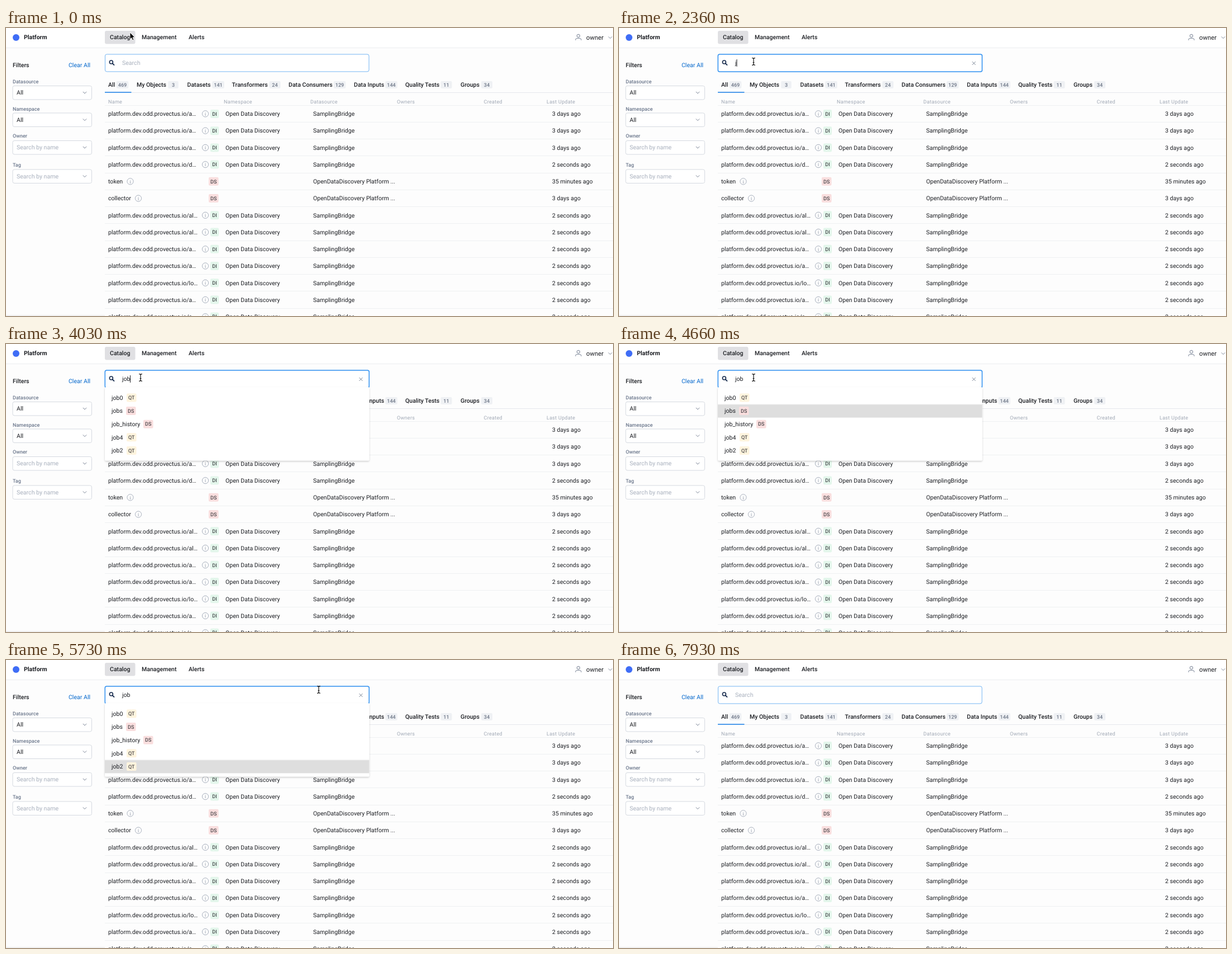
These frames come from a looping animation (1087 by 515 pixels, 8 s). An HTML page:

```html
<!DOCTYPE html>
<html lang="en">
<head>
<meta charset="utf-8">
<title>Catalog search</title>
<style>
html, body { margin: 0; width: 100%; height: 100%; overflow: hidden; background: #fdfdfd; }
svg { display: block; }
text { font: 400 10.57px Roboto, sans-serif; fill: #1c1e23; white-space: pre; text-rendering: geometricPrecision; }
.medium { font-weight: 500; }
.bold { font-weight: 700; }
.link { fill: #0066cc; }
.hint { fill: #a8b0bd; }
.user { font-size: 11.3px; }
.label { font-size: 9.06px; font-weight: 500; fill: #6b778c; }
.head { font-size: 9.06px; letter-spacing: .03em; fill: #a0a8b5; }
.chip, .badge { font-size: 9.06px; text-anchor: middle; }
.chip { font-weight: 500; fill: #6b7485; }
.info { font-size: 8.5px; text-anchor: middle; fill: #8a93a3; }
.line { fill: none; stroke: #a8b0bd; }

/* Percentages are shares of the 8 s loop: 1% = 80 ms. */
.a { animation: 8s step-end -20ms infinite; }
.focus { animation-name: focus; }
.blur { animation-name: blur; }
.menu { animation-name: menu; }
.mark { animation-name: mark; }
.empty { animation-name: empty; }
.j { animation-name: j; }
.o { animation-name: o; }
.b { animation-name: b; }
.caret { animation-name: caret; }
.loading { animation-name: loading; }
.pointer { animation-name: pointer; }
.arrow { animation-name: arrow; }
.beam { animation-name: beam; }
.hand { animation-name: hand; }
.spin { animation: spin 1.33333s linear infinite; }
.dash { animation: dash 1.33333s ease-in-out infinite; }

@keyframes focus { 0%, 93.625% { visibility: hidden } 17.375% { visibility: visible } }
@keyframes blur { 0%, 93.625% { visibility: visible } 17.375% { visibility: hidden } }
@keyframes menu { 0%, 93.625% { visibility: hidden } 43.75% { visibility: visible } }
@keyframes empty { 0%, 81.5% { visibility: visible } 29.5% { visibility: hidden } }
@keyframes j { 0%, 81.5% { visibility: hidden } 29.5% { visibility: visible } }
@keyframes o { 0%, 81.5% { visibility: hidden } 34% { visibility: visible } }
@keyframes b { 0%, 81.5% { visibility: hidden } 37.375% { visibility: visible } }
@keyframes loading { 0%, 45.875% { visibility: hidden } 35.125% { visibility: visible } }
@keyframes mark {
  0%, 81.5% { visibility: hidden; transform: none }
  57.125% { visibility: visible; transform: none }
  58.25% { visibility: visible; transform: translateY(23.6px) }
  59.375% { visibility: visible; transform: translateY(47.2px) }
  61.625% { visibility: visible; transform: translateY(70.8px) }
  62.75% { visibility: visible; transform: translateY(94.4px) }
}
@keyframes caret {
  0%, 26.25%, 81.5%, 93.625% { opacity: 0; transform: translateX(208px) }
  19.625%, 87.125% { opacity: 1; transform: translateX(208px) }
  29.5% { opacity: 1; transform: translateX(210.5px) }
  34% { opacity: 1; transform: translateX(216.4px) }
  37.375%, 50.375%, 62.75%, 76% { opacity: 1; transform: translateX(222px) }
  44.875%, 56%, 69.5% { opacity: 0; transform: translateX(222px) }
}
@keyframes pointer {
  0% { transform: translate(222px, 8px) }
  6.25% { transform: translate(226px, 26px) }
  7.375% { transform: translate(236px, 46px) }
  8.375% { transform: translate(255px, 73px) }
  9.5% { transform: translate(241px, 60px) }
  69.5% { transform: translate(310px, 58px) }
  70.625% { transform: translate(440px, 55px) }
  71.75% { transform: translate(560px, 53px) }
  72.75% { transform: translate(645px, 50px) }
  73.875% { transform: translate(668px, 45px) }
  75% { transform: translate(656px, 52px) }
  76% { transform: translate(638px, 60px) }
  78.25% { transform: translate(637px, 61px) }
  79.375% { transform: translate(636.3px, 62px) }
  90.375% { transform: translate(668px, 54px) }
  91.5% { transform: translate(705px, 50px) }
  92.5% { transform: translate(726px, 46px) }
  95.875% { transform: translate(640px, 51px) }
  97% { transform: translate(430px, 62px) }
  98% { transform: translate(175px, 72px) }
  99.125%, 100% { transform: translate(-8px, 80px) }
}
@keyframes arrow {
  0%, 73.875%, 90.375%, 98% { visibility: visible }
  8.375%, 76%, 95.875% { visibility: hidden }
}
@keyframes beam {
  0%, 73.875%, 98% { visibility: hidden }
  8.375%, 95.875% { visibility: visible }
}
@keyframes hand { 0%, 90.375% { visibility: hidden } 76% { visibility: visible } }
@keyframes spin { to { transform: rotate(360deg) } }
@keyframes dash {
  0% { stroke-dasharray: 1 200; stroke-dashoffset: 0 }
  50% { stroke-dasharray: 100 200; stroke-dashoffset: -15 }
  100% { stroke-dasharray: 100 200; stroke-dashoffset: -125 }
}
</style>
</head>
<body>
<svg id="stage" width="1087" height="515" viewBox="0 0 1087 515"></svg>
<script>
// Text is placed by its left edge and the middle of its capitals.
const text = (x, y, value, cls = '') =>
  `<text x="${x}" y="${y + 3.75}" class="${cls}">${value}</text>`;
const small = (x, y, value, cls) =>
  `<text x="${x}" y="${y + 3.2}" class="${cls}">${value}</text>`;
const rect = (x, y, w, h, fill, extra = '') =>
  `<rect x="${x}" y="${y}" width="${w}" height="${h}" fill="${fill}" ${extra}/>`;
const chevron = (x, y) =>
  `<path d="M${x - 3.2} ${y - 1.6}l3.2 3.2 3.2-3.2" class="line" style="stroke:#7a8496"/>`;

const badgeFill = { DI: '#e3f6eb', DS: '#f9dede', QT: '#fff4de' };
const badge = (x, y, kind) => {
  const width = kind === 'DI' ? 15 : 17.5;
  return rect(x, y - 7.5, width, 15, badgeFill[kind], 'rx="2"') +
    small(x + width / 2, y, kind, 'badge');
};
const info = (x, y) =>
  `<circle cx="${x}" cy="${y}" r="5.6" class="line"/>` + small(x, y, 'i', 'info');

const header = () =>
  rect(0, 0, 1087, 35, '#fff') + rect(0, 35, 1087, 1, '#ebecf0') +
  '<circle cx="18" cy="17" r="6" fill="#3f6df6"/>' +
  text(32, 16.6, 'Platform', 'bold') +
  rect(177, 5, 54.5, 23.5, '#e0e0e3', 'rx="3"') +
  text(186, 16.6, 'Catalog', 'medium') +
  text(243, 16.6, 'Management', 'medium') +
  text(327, 16.6, 'Alerts', 'medium') +
  '<circle cx="1025" cy="14" r="2.7" class="line" style="stroke:#7a8496"/>' +
  '<path d="M1020 22v-1.2q0-2.3 2.3-2.3h5.4q2.3 0 2.3 2.3V22" class="line" style="stroke:#7a8496"/>' +
  text(1039, 17, 'owner', 'user') + chevron(1082, 17);

const filter = (label, labelY, boxY, value, cls) =>
  small(12, labelY, label, 'label') +
  rect(12, boxY - 12, 141.5, 24.5, '#fff', 'rx="3" stroke="#d5d9e0"') +
  text(19, boxY, value, cls) + chevron(141, boxY);

const sidebar = () =>
  text(12, 66, 'Filters', 'medium') + text(112, 66, 'Clear All', 'link') +
  filter('Datasource', 95.5, 115.5, 'All', '') +
  filter('Namespace', 144.5, 164, 'All', '') +
  filter('Owner', 193, 213.5, 'Search by name', 'hint') +
  filter('Tag', 245, 265, 'Search by name', 'hint') +
  rect(0, 513, 177, 2, '#f1f1f2');

const tabs = [
  ['All', 183, 469, 208.5], ['My Objects', 234, 3, 299.5], ['Datasets', 324.5, 141, 380],
  ['Transformers', 404.5, 24, 481.5], ['Data Consumers', 506, 129, 597.5],
  ['Data Inputs', 623, 144, 690], ['Quality Tests', 715, 11, 788.5], ['Groups', 814, 34, 861],
];
const tabBar = () => rect(177, 115, 910, 1, '#e6e8ec') + rect(177, 114, 47.5, 2, '#4d9bea') +
  tabs.map(([name, x, count, mid]) => {
    const width = 17 + 1.5 * String(count).length;
    return text(x, 101.5, name, 'medium') +
      rect(mid - width / 2, 95, width, 13, '#eff1f4', 'rx="2"') + small(mid, 101.5, count, 'chip');
  }).join('');

const columns = [['Name', 183], ['Namespace', 390], ['Datasource', 545], ['Owners', 700],
  ['Created', 855.5], ['Last Update', 968]];
const names = ['a', 'a', 'a', 'd', 'token', 'collector', 'al', 'al', 'a', 'a', 'lo', 'a', 'a'];
const ages = ['3 days', '3 days', '3 days', '2 seconds', '35 minutes', '3 days'];
const infoX = { token: 222.5, collector: 237 };

const row = (name, i) => {
  const y = 153.4 + 30.24 * i;
  const dataset = name in infoX;
  const cells = dataset
    ? text(183, y, name) + info(infoX[name], y) + badge(363, y, 'DS') +
      text(550, y, 'OpenDataDiscovery Platform ...')
    : text(183, y, `platform.dev.odd.provectus.io/${name}…`) + info(357, y) + badge(366, y, 'DI') +
      text(393, y, 'Open Data Discovery') + text(550, y, 'SamplingBridge');
  return cells + text(978, y, `${ages[i] || '2 seconds'} ago`) +
    rect(177, Math.round(y + 14.6), 910, 1, '#eef0f2');
};
const table = () => columns.map(([name, x]) => small(x, 132, name, 'head')).join('') +
  rect(177, 138, 910, 1, '#eef0f2') + names.map(row).join('');

const options = [['job0', 216, 'QT'], ['jobs', 215, 'DS'], ['job_history', 246, 'DS'],
  ['job4', 216, 'QT'], ['job2', 216, 'QT']];
const menu = () => '<g class="a menu">' +
  rect(177, 77, 473.5, 131.5, '#fff', 'rx="2" filter="url(#shadow)"') + '</g>' +
  rect(177, 108 - 23.6, 473.5, 23.6, '#dedede', 'class="a mark"') +
  '<g class="a menu">' + options.map(([name, x, kind], i) => {
    const y = 96 + 23.6 * i;
    return text(189, y, name) + badge(x, y, kind);
  }).join('') + '</g>';

const search = () =>
  rect(177.5, 47, 472.5, 31, '#fff', 'rx="3" stroke="#74b5f3" class="a blur"') +
  rect(177.3, 47, 473, 31.2, '#fff', 'rx="3" stroke="#2d8ff0" stroke-width="1.5" class="a focus"') +
  '<g fill="none" stroke="#14284b" stroke-width="1.6"><circle cx="188.4" cy="61" r="3"/>' +
  '<path d="M190.7 63.3l3.3 3.3" stroke-width="1.9"/></g>' +
  text(208, 62.5, 'Search', 'hint a empty') +
  text(208, 62.5, [...'job'].map(c => `<tspan class="a ${c}">${c}</tspan>`).join('')) +
  rect(0, 56, 1, 13, '#1c1e23', 'class="a caret"') +
  '<path d="M632.5 60l6 6m0-6l-6 6" class="line a focus" style="stroke:#7a8496"/>' +
  '<g class="a loading"><g transform="translate(619.5 63.5) scale(.343)"><g class="spin">' +
  '<circle r="20.2" class="dash" fill="none" stroke="#1c1e23" stroke-width="3.6"/></g></g></g>';

const pointer = () => `<g class="a pointer" stroke-linejoin="round">
  <path class="a arrow" d="M0 0V12.2l2.8-2.6 1.9 4.4 2.2-.9-1.9-4.3h3.8z" fill="#000" stroke="#fff" stroke-width=".9"/>
  <path class="a beam" d="M-2.8-6.4Q0-6.4 0-4.6Q0-6.4 2.8-6.4M0-5V5M-2.8 6.4Q0 6.4 0 4.6Q0 6.4 2.8 6.4M-1.4 1.8h2.8" fill="none" stroke="#000" stroke-width="1.1"/>
  <path class="a hand" d="M-1.6 9V1.5Q-1.6 .3-.4 .3T.8 1.5V5.6Q2.8 4.6 3.2 6.2Q5 5.4 5.3 6.9Q7.4 6.5 7.4 8.4Q7.4 11.5 6 13V14.8H-.5Q-1.4 12.6-4.6 9.3Q-5.2 7.8-3.8 7.6Q-2.7 7.8-1.6 9zM1.3 10.2v2.6M3.1 10.2v2.6M4.9 10.2v2.6" fill="#fff" stroke="#000" stroke-width="1"/>
</g>`;

// The open menu covers the lower edge of the search box.
document.getElementById('stage').innerHTML =
  `<defs><filter id="shadow" x="-5%" y="-10%" width="110%" height="125%">
    <feDropShadow dx="0" dy="1.6" stdDeviation="1.4" flood-color="#000" flood-opacity=".2"/>
  </filter></defs>` +
  header() + sidebar() + tabBar() + table() + search() + menu() + pointer();
</script>
</body>
</html>
```
